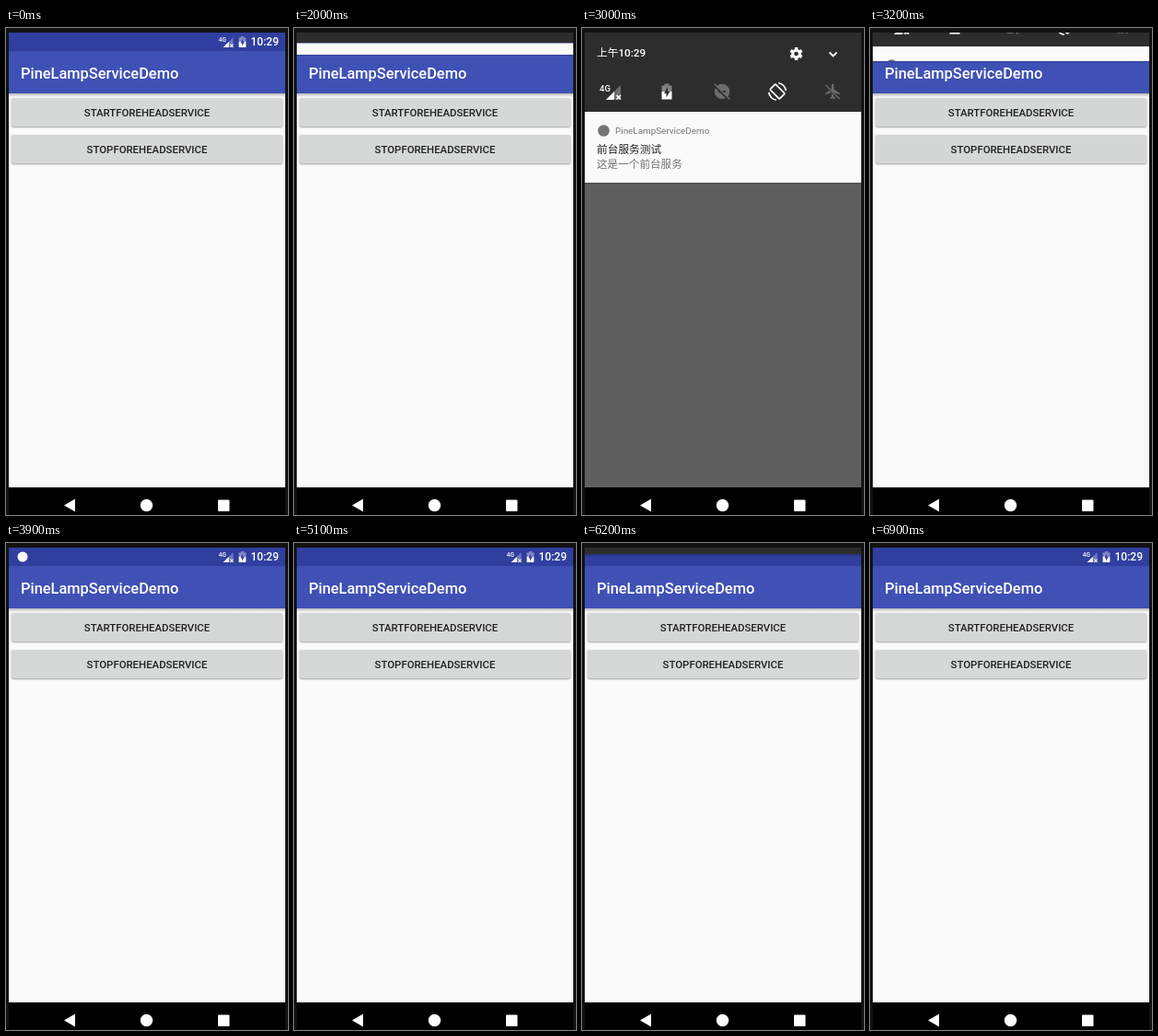
An HTML page with a canvas for the animation above (7.7 s loop, 306 px wide and 529 px high).

```html
<!DOCTYPE html>
<html lang="zh">
<head>
<meta charset="utf-8">
<title>Foreground service</title>
<style>
  html, body { margin: 0; width: 100%; height: 100%; overflow: hidden; background: #121212; }
  canvas { display: block; width: 306px; height: 529px; }
</style>
</head>
<body>
<canvas id="stage" width="306" height="529"></canvas>
<script>
const LOOP = 7700, STEP = 100;
const APP_NAME = 'PineLampServiceDemo';
const FONT = "Roboto, 'Noto Sans CJK SC', 'Noto Sans CJK JP', 'Noto Sans CJK', sans-serif";
const TOP = 5, BOTTOM = 499, LEFT = 3, WIDTH = 300;
const QS_HEIGHT = 91, CARD_HEIGHT = 77;
const WHITE = '#fff', PANEL = '#2d2d2d', DIM = '#6c6c6c';

// Keyframes: [ms, value]
const PULL = [
  [1900, 0], [2000, .147], [2100, .45], [2200, .8], [2300, 1], [3000, 1],
  [3100, .6], [3200, .19], [3300, .09], [3400, .04], [3500, .015], [3600, 0],
  [5100, 0], [5200, .13], [5300, .4], [5400, .75], [5500, 1], [5900, 1],
  [6000, .6], [6100, .25], [6200, .1], [6300, .05], [6400, .02], [6500, 0]
];
const STRETCH = [
  [2200, 0], [2300, 22], [2400, 39], [2800, 39], [2900, 20], [3000, 0],
  [5400, 0], [5500, 25], [5600, 40], [5700, 40], [5800, 24], [5900, 0]
];
const STATUS = [
  [1900, 1], [2000, 0], [3600, 0], [3900, 1],
  [5100, 1], [5200, 0], [6500, 0], [6900, 1]
];
const NOTICE = [[500, 0], [700, 1], [4000, 1], [4200, 0]];

const ctx = document.getElementById('stage').getContext('2d');
const plane = new Path2D('M21 16v-2l-8-5V3.5C13 2.7 12.3 2 11.5 2S10 2.7 10 3.5V9l-8 5v2l8-2.5V19l-2 1.5V22l3.5-1 3.5 1v-1.5L13 19v-5.5z');

function valueAt(keys, t) {
  if (t <= keys[0][0]) return keys[0][1];
  for (let i = 1; i < keys.length; i++) {
    const [t0, a] = keys[i - 1], [t1, b] = keys[i];
    if (t <= t1) return a + (b - a) * (t - t0) / (t1 - t0);
  }
  return keys[keys.length - 1][1];
}

function rect(x, y, w, h, color) {
  ctx.fillStyle = color;
  ctx.fillRect(x, y, w, h);
}

function disc(x, y, r, color) {
  ctx.fillStyle = color;
  ctx.beginPath();
  ctx.arc(x, y, r, 0, 2 * Math.PI);
  ctx.fill();
}

function shape(points, color) {
  ctx.fillStyle = color;
  ctx.beginPath();
  points.forEach(([x, y]) => ctx.lineTo(x, y));
  ctx.fill();
}

function line(points, color, width) {
  ctx.strokeStyle = color;
  ctx.lineWidth = width;
  ctx.beginPath();
  points.forEach(([x, y]) => ctx.lineTo(x, y));
  ctx.stroke();
}

function text(str, x, y, size, color, weight = 400, align = 'left') {
  ctx.font = `${weight} ${size}px ${FONT}`;
  ctx.textAlign = align;
  ctx.fillStyle = color;
  ctx.fillText(str, x, y);
}

function roundRect(x, y, w, h, r) {
  ctx.beginPath();
  ctx.roundRect(x, y, w, h, r);
}

function shadow(y, height, alpha) {
  const fade = ctx.createLinearGradient(0, y, 0, y + height);
  fade.addColorStop(0, `rgba(0,0,0,${alpha})`);
  fade.addColorStop(1, 'rgba(0,0,0,0)');
  rect(LEFT, y, WIDTH, height, fade);
}

function place(x, y, scale, alpha, draw) {
  ctx.save();
  ctx.translate(x, y);
  ctx.scale(scale, scale);
  ctx.globalAlpha *= alpha;
  draw();
  ctx.restore();
}

// Icons, each centred on the origin
function signalIcon() {
  shape([[-5, 9], [11, 9], [11, -7]], 'rgba(255,255,255,.3)');
  shape([[-5, 9], [4, 9], [4, 0]], WHITE);
  line([[6.5, 4], [11, 8.5]], WHITE, 1.6);
  line([[11, 4], [6.5, 8.5]], WHITE, 1.6);
  text('4G', -12, -.5, 9.5, WHITE, 500);
}

function batteryIcon(bolt) {
  rect(-2.5, -8.5, 5, 2, 'rgba(255,255,255,.4)');
  rect(-5.5, -6.5, 11, 6.5, 'rgba(255,255,255,.4)');
  rect(-5.5, 0, 11, 8.5, WHITE);
  shape([[1, -5], [-3, 2], [-.5, 2], [-.5, 6.5], [3.3, 0], [1, 0]], bolt);
}

function silentIcon() {
  disc(0, 0, 8.3, DIM);
  rect(-4, -1, 8, 2, PANEL);
  line([[-9, -7], [8, 10]], PANEL, 2);
  line([[-8.5, -8.5], [8.5, 8.5]], DIM, 1.5);
}

function rotateIcon() {
  ctx.strokeStyle = WHITE;
  ctx.lineWidth = 1.7;
  ctx.save();
  ctx.rotate(-Math.PI / 4);
  roundRect(-4.2, -7.3, 8.4, 14.6, 1);
  ctx.stroke();
  ctx.restore();
  for (const start of [-1.45, Math.PI - 1.45]) {
    ctx.beginPath();
    ctx.arc(0, 0, 9.3, start, start + 1.35);
    ctx.stroke();
  }
}

function planeIcon() {
  ctx.save();
  ctx.scale(.82, .82);
  ctx.translate(-11.5, -12);
  ctx.fillStyle = DIM;
  ctx.fill(plane);
  ctx.restore();
  line([[-7, -5.5], [6.5, 8]], PANEL, 2);
  line([[-7.5, -7], [7.5, 8]], DIM, 1.5);
}

function gearIcon() {
  for (let i = 0; i < 6; i++) {
    ctx.save();
    ctx.rotate(i * Math.PI / 3);
    rect(-1.7, -7, 3.4, 4, WHITE);
    ctx.restore();
  }
  disc(0, 0, 5.3, WHITE);
  disc(0, 0, 2.3, PANEL);
}

function personIcon() {
  disc(0, 0, 10, '#4a86c8');
  disc(0, -3, 3, PANEL);
  ctx.beginPath();
  ctx.ellipse(0, 5, 6, 3, 0, 0, 2 * Math.PI);
  ctx.fill();
}

function pencilIcon() {
  line([[-5, 5], [3, -3]], WHITE, 3.4);
  line([[4, -4], [6, -6]], WHITE, 3.4);
}

function button(label, y, ripple) {
  ctx.save();
  ctx.shadowColor = 'rgba(0,0,0,.35)';
  ctx.shadowBlur = 2;
  ctx.shadowOffsetY = 1;
  ctx.fillStyle = '#d6d7d7';
  roundRect(6, y, 294, 31, 2);
  ctx.fill();
  ctx.restore();
  if (ripple) {
    ctx.save();
    roundRect(6, y, 294, 31, 2);
    ctx.clip();
    rect(6, y, 294, 31, 'rgba(0,0,0,.06)');
    disc(ripple, y + 18, 70, 'rgba(0,0,0,.08)');
    ctx.restore();
  }
  text(label, 153, y + 20, 11.4, '#212121', 500, 'center');
}

function drawApp(t) {
  rect(LEFT, TOP, WIDTH, BOTTOM - TOP, '#fafafa');
  rect(LEFT, TOP, WIDTH, 20, '#303f9f');
  rect(LEFT, 25, WIDTH, 46, '#3f51b5');
  shadow(71, 4, .28);
  text(APP_NAME, 16, 54.5, 16.4, WHITE, 500);
  button('STARTFOREHEADSERVICE', 76, t === 600 && 183);
  button('STOPFOREHEADSERVICE', 116, t === 4100 && 163);

  ctx.save();
  ctx.globalAlpha = valueAt(STATUS, t);
  place(239, 15, .68, 1, signalIcon);
  place(256.5, 15, .7, 1, () => batteryIcon('#303f9f'));
  text('10:29', 296, 19.3, 12, WHITE, 500, 'right');
  ctx.globalAlpha *= valueAt(NOTICE, t);
  disc(18, 15, 5.5, WHITE);
  ctx.restore();
}

function drawCard(top, height) {
  ctx.save();
  ctx.beginPath();
  ctx.rect(LEFT, top, WIDTH, height);
  ctx.clip();
  rect(LEFT, top, WIDTH, height, '#fafafa');
  disc(23.5, top + 20.5, 6.3, '#757575');
  text(APP_NAME, 36, top + 24, 9.9, '#757575');
  text('前台服务测试', 16, top + 44.5, 11.7, '#212121');
  text('这是一个前台服务', 16, top + 60.5, 11.6, '#757575');
  ctx.restore();
  shadow(top + height, 2, .2);
}

function drawQuickSettings(bottom, stretch) {
  ctx.save();
  ctx.beginPath();
  ctx.rect(LEFT, TOP, WIDTH, Math.max(0, bottom - TOP));
  ctx.clip();
  rect(LEFT, TOP, WIDTH, bottom - TOP, PANEL);
  ctx.translate(0, bottom - stretch - QS_HEIGHT);

  const grow = stretch / 24;
  text('上午10:29', 16, 30.5, 11.7, WHITE, 500);
  place(232.5, 28, 1, 1, gearIcon);
  line([[268.5, 26.5], [272.5, 30.5], [276.5, 26.5]], WHITE, 1.8);
  if (stretch > 0) {
    place(152, 28, 1, .25 * grow, personIcon);
    place(192, 28, 1, .2 * grow, pencilIcon);
    place(16, 43, 1, .17 * grow, () => text('1月21日周六', 0, 0, 11.4, WHITE));
  }

  const tiles = [
    [signalIcon, 31, 2, .48], [() => batteryIcon(PANEL), 92, 4, .49],
    [silentIcon, 152, 6, .49], [rotateIcon, 212, -9, .96], [planeIcon, 272, -8, 1]
  ];
  for (const [draw, x, dx, drop] of tiles) place(x + dx * grow, 69 + stretch * drop, 1, 1, draw);
  ctx.restore();
}

function drawShade(t) {
  const pull = valueAt(PULL, t);
  if (pull <= 0) return;
  const stretch = valueAt(STRETCH, t);
  const reach = Math.max(0, pull * 1.2 - .2);
  const scrim = reach && .62 * (1 + Math.cos(Math.PI * (1 - reach) ** 2)) / 2;
  rect(LEFT, TOP, WIDTH, BOTTOM - TOP, `rgba(0,0,0,${scrim})`);

  const qsBottom = 3.4 + 87.6 * pull + stretch;
  if (t < 4000) {
    const cardBottom = TOP + (QS_HEIGHT + CARD_HEIGHT - TOP) * pull + stretch;
    drawCard(qsBottom, cardBottom - qsBottom);
  } else {
    place(152.5, qsBottom + 38, 1, pull ** 2, () => text('没有通知', 0, 0, 13.3, WHITE, 400, 'center'));
    shadow(qsBottom, 3, .25);
  }
  drawQuickSettings(qsBottom, stretch);
}

function drawFrame() {
  rect(0, 0, 306, 529, '#121212');
  rect(LEFT, BOTTOM, WIDTH, 30, '#000');
  shape([[63, 518.5], [75, 511.5], [75, 525.5]], WHITE);
  disc(152.5, 518.5, 6.7, WHITE);
  ctx.fillStyle = WHITE;
  roundRect(230, 512.5, 12.5, 12.5, 1);
  ctx.fill();
}

function render(now) {
  const t = Math.floor((now % LOOP) / STEP) * STEP;
  drawFrame();
  ctx.save();
  ctx.beginPath();
  ctx.rect(LEFT, TOP, WIDTH, BOTTOM - TOP);
  ctx.clip();
  drawApp(t);
  drawShade(t);
  ctx.restore();
}

let start;
function tick(now) {
  start ??= now;
  render(Math.max(0, now - start));
  requestAnimationFrame(tick);
}
render(0);
requestAnimationFrame(tick);
</script>
</body>
</html>
```
